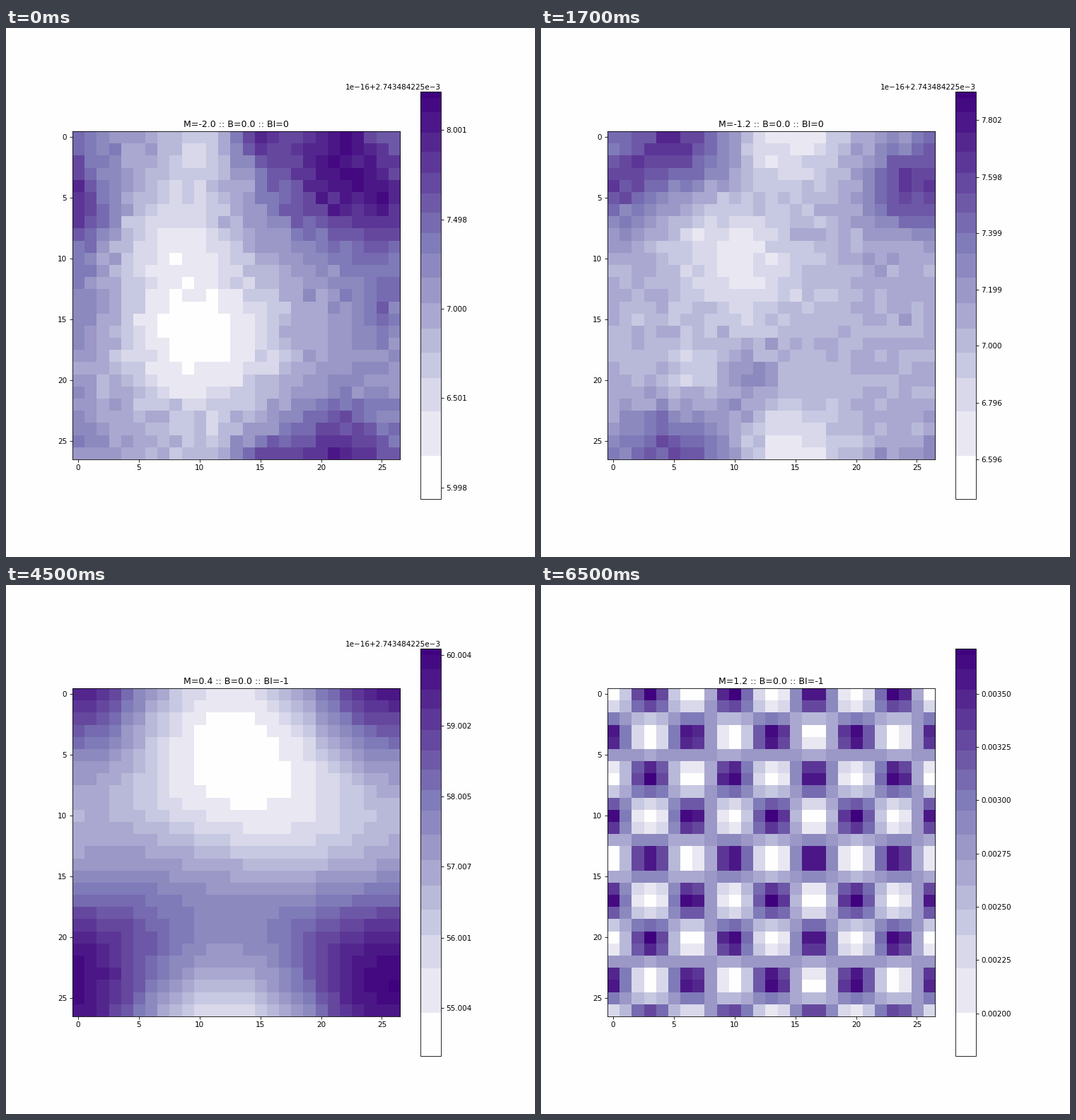
A matplotlib script that plays this animation: 748x748 px, repeating every 8000 ms.

```python
import numpy as np
import matplotlib as mpl
import matplotlib.pyplot as plt
from matplotlib.animation import FuncAnimation
from matplotlib.colors import ListedColormap, to_rgb

CELLS = 27
PAGE = "#fefefe"
OFFSET = "1e\N{MINUS SIGN}16+2.743484225e\N{MINUS SIGN}3"
Y, X = np.mgrid[:CELLS, :CELLS]


def banded_purples():
    """Purples reduced to a few flat steps, the lowest one blank."""
    edges = np.r_[0, .106, .216, np.linspace(.297, .603, 6),
                  np.linspace(.652, .95, 7), .985, 1]
    edges = np.round(edges * 256).astype(int)
    colors = mpl.colormaps["Purples"](np.arange(256))[:, :3]
    for low, high in zip(edges[:-1], edges[1:]):
        colors[low:high] = colors[low:high].mean(axis=0)
    colors[:edges[1]] = to_rgb(PAGE)
    return ListedColormap(colors)


def wave(height, x_count, x_peak, y_count, y_peak):
    turn = 2 * np.pi / CELLS
    return (height * np.cos(turn * x_count * (X - x_peak))
            * np.cos(turn * y_count * (Y - y_peak)))


def wrapped(distance):
    return (distance + CELLS / 2) % CELLS - CELLS / 2


def bump(x, y, radius, height):
    """Round hill or hollow on a lattice whose opposite sides meet."""
    return height * np.exp(-(wrapped(X - x) ** 2 + wrapped(Y - y) ** 2) / radius ** 2)


def grain(seed, size=.03):
    return np.random.default_rng(seed).normal(0, size, X.shape)


cold = (.49 + grain(1)
        + bump(10, 16.5, 6, -.47) + bump(8, 8, 4.5, -.25) + bump(10.5, 1, 3.5, -.2)
        + bump(21.5, 3, 6, .42) + bump(26.5, 6, 3.5, .22) + bump(22, 24.5, 4, .15)
        + bump(14.5, 0, 2.5, .3) + bump(25.5, 13.5, 3.5, .17))
cool = (.42 + grain(2)
        + bump(5, .5, 5, .4) + bump(24, 4, 4, .27) + bump(0, 5, 4, .13)
        + bump(14.5, 26.5, 4, -.29) + bump(11, 11, 4.5, -.23) + bump(7, 7, 4, -.13)
        + bump(11, 20, 2.5, .15) + bump(6.5, 19.5, 3, -.13))
mild = (.48 + grain(3)
        + bump(24, 0, 3.5, .28) + bump(23, 24, 4, .25) + bump(24, 5, 3.5, .15)
        + bump(2, 23.5, 4, .32) + bump(5, 0, 2.5, .18) + bump(0, 4.5, 3.5, .18)
        + bump(11, 3, 4.5, -.27) + bump(8, 8, 5, -.13)
        + bump(14, 16, 3, .22) + bump(2.5, 13, 4.5, -.12))
warm = (.49 + wave(.205, 1, -.5, 0, 0) + wave(.238, 0, 0, 1, 21.2)
        + wave(.16, 1, -.5, 1, 1) + wave(.06, 1, 19.75, 1, 25))
hot = .5 + wave(.5, 4, 3, 4, 0)

# field, title, (low, high) of the scale, tick labels, offset text, blank top
SCENES = [
    (cold, "M=-2.0 :: B=0.0 :: BI=0", (5.936, 8.216),
     "5.998 6.501 7.000 7.498 8.001", OFFSET, 0),
    (cool, "M=-1.2 :: B=0.0 :: BI=0", (6.455, 7.902),
     "6.596 6.796 7.000 7.199 7.399 7.598 7.802", OFFSET, 0),
    (mild, "M=-0.4 :: B=0.0 :: BI=0", (6.532, 7.569),
     "6.596 6.796 7.000 7.199 7.399", OFFSET, .0055),
    (warm, "M=0.4 :: B=0.0 :: BI=-1", (54.331, 60.0965),
     "55.004 56.001 57.007 58.005 59.002 60.004", OFFSET, 0),
    (hot, "M=1.2 :: B=0.0 :: BI=-1", (.0018, .003713),
     "0.00200 0.00225 0.00250 0.00275 0.00300 0.00325 0.00350", "", 0),
]

fig, ax = plt.subplots(figsize=(10, 10), dpi=74.8, facecolor=PAGE)
image = ax.imshow(cold, cmap=banded_purples(), vmin=0, vmax=1,
                  interpolation="nearest")
title = ax.set_title("")
bar = fig.colorbar(image)
offset_text = bar.ax.annotate("", (1, 1), xycoords="axes fraction",
                              xytext=(0, 3), textcoords="offset points",
                              ha="right", va="baseline", annotation_clip=False)
blank = plt.Rectangle((0, 1), 1, 0, transform=bar.ax.transAxes,
                      facecolor=PAGE, edgecolor="none", zorder=2)
bar.ax.add_patch(blank)


def draw(frame):
    # The first scene lasts one step, the following ones four steps each.
    field, name, (low, high), labels, offset, gap = SCENES[(frame + 3) // 4]
    labels = labels.split()
    image.set_data(field)
    title.set_text(name)
    bar.set_ticks([(float(s) - low) / (high - low) for s in labels], labels=labels)
    offset_text.set_text(offset)
    blank.set_bounds(0, 1 - gap, 1, gap)
    return image, title, offset_text, blank


anim = FuncAnimation(fig, draw, frames=16, interval=500, repeat=True,
                     repeat_delay=0, blit=False)
plt.show()
```
